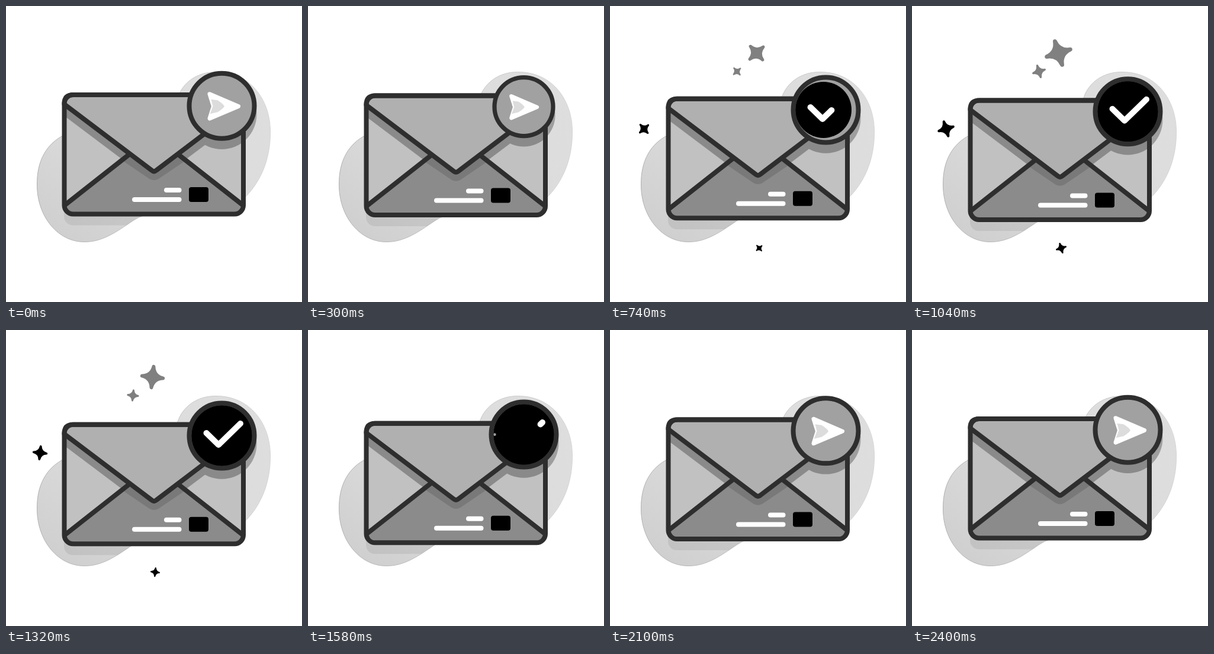
Recreate the animation shown at these times as an HTML page. Size 500 by 500 pixels, loop 2420 ms.

```html
<!DOCTYPE html>
<html lang="en">
<head>
<meta charset="utf-8">
<title>Mail sent</title>
<style>
  html, body { margin: 0; width: 100%; height: 100%; overflow: hidden; background: #fff; }
  svg { display: block; width: 100%; height: 100%; }
  .line { fill: none; stroke: #2e2e2e; stroke-width: 8; stroke-linejoin: round; }
  .white { fill: none; stroke: #fff; stroke-width: 8; stroke-linecap: round; stroke-linejoin: round; }
</style>
</head>
<body>
<svg viewBox="0 0 500 500">
  <defs>
    <linearGradient id="shade" x1="0" y1="1" x2="1" y2="0">
      <stop offset="0" stop-color="#cdcdcd"/>
      <stop offset=".45" stop-color="#dcdcdc"/>
      <stop offset="1" stop-color="#dedede"/>
    </linearGradient>
    <linearGradient id="rim">
      <stop offset="0" stop-color="#b0b0b0"/>
      <stop offset="1" stop-color="#d4d4d4"/>
    </linearGradient>
    <path id="blob" d="M52.500 302C52 262 68 232 100 217C170 190 250 215 290 155C298 130 322 111.500 354 111.500C412 111 446.500 158 446.500 212C447 262 428 300 402 325C350 362 262 330 214 363C186 382 163 398.500 133 398.500C88 399 52.500 356 52.500 302Z"/>
    <clipPath id="inBlob"><use href="#blob"/></clipPath>
    <clipPath id="inBadge"><circle r="52"/></clipPath>
  </defs>

  <use href="#blob" fill="url(#shade)" stroke="url(#rim)"/>
  <g clip-path="url(#inBlob)">
    <rect id="drop" x="98" y="200" width="303" height="170.500" rx="15" opacity=".07"/>
  </g>

  <g id="mail">
    <rect x="98.500" y="150" width="302.500" height="201.500" rx="15" fill="#c1c1c1"/>
    <g opacity=".28">
      <path d="M99 160V186L240 292Q250 300 260 292L401 186V160Z"/>
      <circle id="badgeShadow" r="59"/>
    </g>
    <path d="M98.500 337L209 250H290L401 337V340Q401 351.500 386 351.500H114Q98.500 351.500 98.500 340Z" fill="#8b8b8b"/>
    <path d="M195 260L209 250H290L305 260L260 290.500Q250 298 240 290.500Z" opacity=".13"/>
    <path class="line" d="M98.500 337L209 250M401 337L290 250"/>
    <path class="line" style="fill:#b0b0b0" d="M98.500 166V165Q98.500 150 113.500 150H386Q401 150 401 165V166L254 277.500Q250 281 246 277.500Z"/>
    <rect class="line" x="98.500" y="150" width="302.500" height="201.500" rx="15"/>
    <path class="white" d="M271 311H292.500M217 327H292.500"/>
    <rect x="309" y="306" width="33" height="25" rx="4"/>

    <g id="badge">
      <circle r="53" fill="#a1a1a1"/>
      <circle id="dark"/>
      <path id="tick" class="white" style="stroke-width:10" pathLength="1" d="M-26-4.500L-5.500 15.500L31.500-20.500"/>
      <circle id="light" fill="#a1a1a1"/>
      <g clip-path="url(#inBadge)">
        <g id="plane">
          <path class="white" style="fill:#fff;stroke-width:7" d="M-20.500-20L28 .8L-20.500 21.300L-14 .8Z"/>
          <path fill="#dcdcdc" d="M-18-11L-7-9.500Q2-4 4.500 .8Q2 5-7 10.500L-20 13.500L-15 .8Z"/>
        </g>
      </g>
      <circle class="line" r="55"/>
    </g>
  </g>
  <g id="stars"></g>
</svg>
<script>
const LOOP = 2420, RADIUS = 51.5;
const $ = id => document.getElementById(id);
const progress = (t, start, length) => Math.min(1, Math.max(0, (t - start) / length));
const smooth = p => (1 - Math.cos(Math.PI * p)) / 2;
const easeOut = p => 1 - (1 - p) ** 3;

const starPath = 'M0-.85Q.1-.1 .85 0Q.1 .1 0 .85Q-.1 .1-.85 0Q-.1-.1 0-.85Z';
const stars = [
  [247.5, 79.5, 24.5, '#808080'],
  [214.5, 110.5, 12, '#808080'],
  [57.5, 207.5, 15, '#000'],
  [252, 409, 9.5, '#000'],
].map(([x, y, size, color]) => {
  const node = document.createElementNS('http://www.w3.org/2000/svg', 'path');
  const look = { d: starPath, fill: color, stroke: color, 'stroke-width': .28, 'stroke-linejoin': 'round' };
  for (const name in look) node.setAttribute(name, look[name]);
  $('stars').append(node);
  return { node, x, y, size };
});

// Discs open from the left edge of the badge.
function openDisc(id, amount) {
  $(id).setAttribute('r', RADIUS * amount);
  $(id).setAttribute('cx', RADIUS * (amount - 1));
}

function planeShift(t) {
  if (t > 1540) return -100 * (1 - easeOut(progress(t, 1560, 500)));
  return -3 * smooth(progress(t, 0, 300)) + 110 * progress(t, 320, 280) ** 2;
}

function draw(t) {
  const bob = 10 * smooth(2 * t / LOOP);
  const scale = 1 - .1 * smooth(2 * progress(t, 0, 600));
  $('mail').setAttribute('transform', `translate(0 ${bob})`);
  $('drop').setAttribute('transform', `translate(0 ${bob})`);
  $('badge').setAttribute('transform', `translate(364.5 168.700) scale(${scale})`);
  $('badgeShadow').setAttribute('transform', `translate(364.5 183) scale(${scale})`);

  openDisc('dark', smooth(progress(t, 495, 300)));
  openDisc('light', smooth(progress(t, 1540, 300)));
  $('plane').setAttribute('transform', `translate(${planeShift(t)} 0)`);

  const from = smooth(progress(t, 1328, 300));
  const to = smooth(progress(t, 567, 300));
  $('tick').style.display = to > from ? '' : 'none';
  $('tick').setAttribute('stroke-dasharray', `${to - from} 2`);
  $('tick').setAttribute('stroke-dashoffset', -from);

  const grow = easeOut(progress(t, 560, 500)) - progress(t, 1060, 500) ** 3;
  const turn = -42 + (t - 740) / 12;
  for (const { node, x, y, size } of stars) {
    node.style.display = grow > 0 ? '' : 'none';
    node.setAttribute('transform', `translate(${x} ${y}) rotate(${turn}) scale(${size * grow})`);
  }
}

function tick() {
  draw(performance.now() % LOOP);
  requestAnimationFrame(tick);
}
tick();
</script>
</body>
</html>
```
